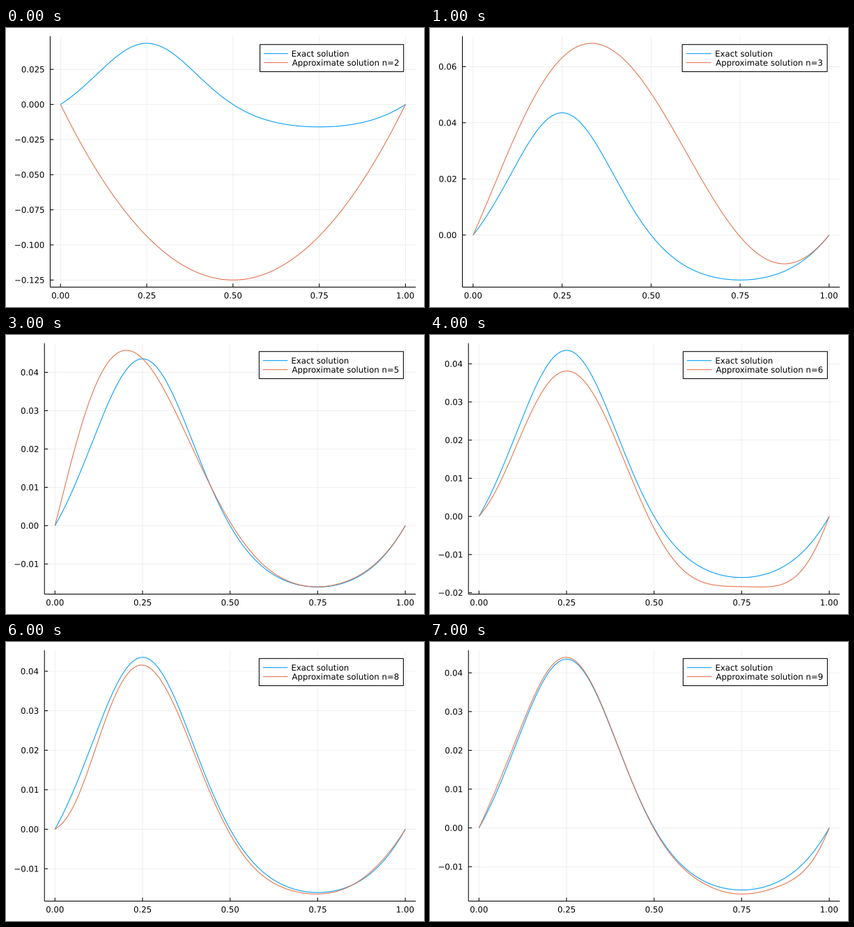
Recreate the animation shown at these times as a matplotlib script. Size 600 px wide and 400 px high, loop 8 s.

```python
import matplotlib.pyplot as plt
import numpy as np
from matplotlib.animation import FuncAnimation
from matplotlib.patches import PathPatch, Rectangle
from matplotlib.textpath import TextPath
from matplotlib.transforms import Affine2D

W, H, DPI = 600, 400, 100
PX = 72 / DPI  # points per pixel
TOP, BOTTOM, RIGHT = 11.8, 371.5, 588.2
TEXT_SIZE = 11.75
ALIGN = {"left": 0, "center": 0.5, "right": 1}
BLUE, ORANGE = "#009AFA", "#E36F47"

plt.rcParams["font.family"] = "DejaVu Sans"

fig = plt.figure(figsize=(W / DPI, H / DPI), dpi=DPI, facecolor="white")
ax = fig.add_axes([0, 0, 1, 1])

xs = np.linspace(0, 1, 501)
exact = (np.exp(np.sin(2 * np.pi * xs)) - 1) / (4 * np.pi ** 2)


def source_term(x):
    s, c = np.sin(2 * np.pi * x), np.cos(2 * np.pi * x)
    return (c * c - s) * np.exp(s)


def approximate(n):
    """Solve u'' = p, u(0) = u(1) = 0, with p interpolating at n + 1 nodes."""
    nodes = np.linspace(0, 1, n + 1)
    u = np.polyint(np.polyfit(nodes, source_term(nodes), n), 2)
    return np.polyval(u, xs) - np.polyval(u, 1) * xs


def line(x, y, color="black", width=1.05, **kw):
    ax.plot(x, y, color=color, lw=width * PX, solid_capstyle="butt",
            snap=False, **kw)


def grid(x, y):
    line(x, y, width=0.6, alpha=0.1)


def label(x, y, text, align="left"):
    """Draw text as outlines, centred on y and aligned by its ink."""
    path = TextPath((0, 0), text, size=TEXT_SIZE)
    box = path.get_extents()
    dx = x - box.x0 - ALIGN[align] * box.width
    place = Affine2D().scale(1, -1).translate(dx, y + 4.3)
    ax.add_patch(PathPatch(place.transform_path(path), fc="black", lw=0,
                           snap=False, zorder=6))


def legend(n, width):
    right = RIGHT - width / 30
    box_w = 147.4 + 0.112 * width
    left, top, height = right - box_w, 23.7, 38.9
    ax.add_patch(Rectangle((left, top), box_w, height, fc="white", ec="black",
                           lw=1.05 * PX, snap=False, zorder=4))
    start = left + 5.5
    rows = ((BLUE, "Exact solution"),
            (ORANGE, f"Approximate solution n={n}"))
    for i, (color, text) in enumerate(rows, 1):
        y = top + i * height / 3
        line([start, start + width / 15], [y, y], color, zorder=5)
        label(right - 159.9, y, text)


def draw(i):
    n = i + 2
    approx = approximate(n)
    step, digits, left = ((0.025, 3, 63.4) if n == 2 else
                          (0.02, 2, 46.5) if n < 5 else
                          (0.01, 2, 55.2))
    width = RIGHT - left
    lo = min(exact.min(), approx.min())
    hi = max(exact.max(), approx.max())
    pad = 0.03 * (hi - lo)
    lo, hi = lo - pad, hi + pad

    def to_x(x):
        return left + (x + 0.03) / 1.06 * width

    def to_y(y):
        return BOTTOM - (y - lo) / (hi - lo) * (BOTTOM - TOP)

    ax.clear()
    ax.set(xlim=(0, W), ylim=(H, 0))
    ax.axis("off")

    for v in np.linspace(0, 1, 5):
        x = to_x(v)
        grid([x, x], [TOP, BOTTOM])
        line([x, x], [BOTTOM - 5, BOTTOM])
        label(x, 383.4, f"{v:.2f}", "center")
    for k in range(int(np.ceil(lo / step)), int(np.floor(hi / step)) + 1):
        y = to_y(k * step)
        grid([left, RIGHT], [y, y])
        line([left, left + 5], [y, y])
        text = f"{k * step:.{digits}f}".replace("-", "\u2212")
        label(left - 8.9, y, text, "right")

    line([left, left], [TOP, BOTTOM])
    line([left, RIGHT], [BOTTOM, BOTTOM])
    line(to_x(xs), to_y(exact), BLUE)
    line(to_x(xs), to_y(approx), ORANGE)
    legend(n, width)
    return []


anim = FuncAnimation(fig, draw, frames=8, interval=1000, init_func=lambda: [],
                     repeat=True, repeat_delay=0)
plt.show()
```
